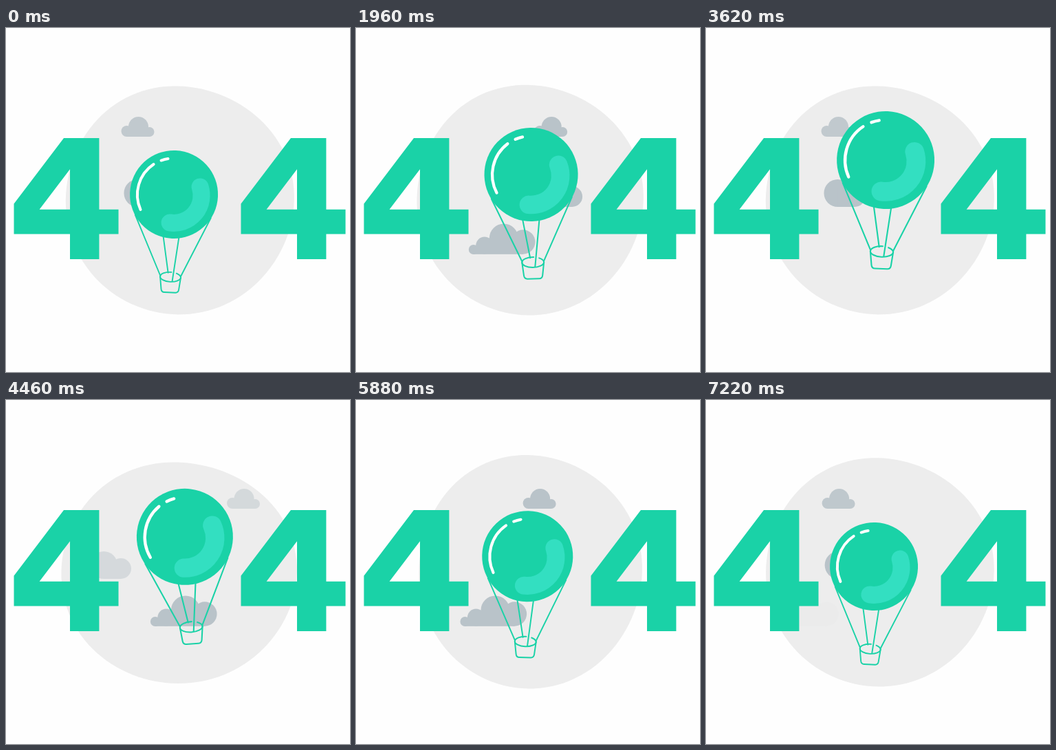
Write an HTML page that moves like this. It is 500x500 px and loops after 7240 ms.

```html
<!DOCTYPE html>
<html lang="en">
<head>
<meta charset="utf-8">
<title>404</title>
<style>
  html, body { margin: 0; width: 100%; height: 100%; overflow: hidden; background: #fefefe; }
  svg { display: block; width: 100vw; height: 100vh; }
  .green { fill: #1ad2a7; }
  .cloud { fill: #b9c3c9; }
  .line { fill: none; stroke-linecap: round; stroke-linejoin: round; }
</style>
</head>
<body>
<svg viewBox="0 0 500 500" role="img" aria-label="404">
  <defs>
    <path id="four" class="green" fill-rule="evenodd"
      d="M11.5 255.5L84 160H135.4V263.8H163.5V299.5H135.4V336H93V299.5H11.5ZM93 205.2L48.6 263.8H93Z"/>
  </defs>
  <path id="blob" fill="#ededed"/>
  <g id="small" class="cloud">
    <circle cx="-17" cy="150" r="8"/><circle cy="143.5" r="14.5"/><circle cx="16" cy="151" r="7"/>
    <rect x="-17" y="146" width="33" height="12"/>
  </g>
  <g id="middle" class="cloud">
    <circle cx="20" cy="240" r="20"/><circle cx="45" cy="245" r="15"/>
    <rect x="20" y="232" width="25" height="28"/>
  </g>
  <g id="large" class="cloud">
    <circle cx="7" cy="322" r="7"/><circle cx="23" cy="316" r="12.5"/>
    <circle cx="51" cy="305.5" r="21"/><circle cx="79" cy="311" r="17.7"/>
    <rect x="7" y="316" width="72" height="12.8"/>
  </g>
  <use href="#four"/>
  <use href="#four" x="330"/>
  <g id="balloon">
    <g class="line" stroke="#1ad2a7" stroke-width="1.9">
      <path d="M-55 32L-14.7 119M55 32L14.7 119M-13 61L-3.7 114M10 61L2.8 126"/>
      <path d="M1 113A15 7 0 1 0 15 120Q14.6 116.6 8.5 114.4"/>
      <path d="M-15 120L-12.8 138Q-12.3 142.5 -8 142.5H8Q12.3 142.5 12.8 138L15 120"/>
    </g>
    <circle class="green" r="64"/>
    <path class="line" stroke="#33dfc1" stroke-width="25" d="M37.5 -12.6A40 40 0 0 1 -4.3 41.2"/>
    <path class="line" stroke="#fff" stroke-width="4"
      d="M-47.6 24A53.2 53.2 0 0 1 -31.3 -42.7M-20.6 -48.6A53 53 0 0 1 -10.7 -51.6"/>
  </g>
</svg>
<script>
const LOOP = 7240, HALF = LOOP / 2, FADE = 640, TAU = 2 * Math.PI;
const { sin, cos, min, max } = Math;
const $ = id => document.getElementById(id);
const place = (id, transform) => $(id).setAttribute("transform", transform);

// A circle that swells sideways, then upright, with slight fixed unevenness.
function drawBlob(t) {
  const swell = sin(TAU * t / HALF);
  const points = Array.from({ length: 120 }, (_, i) => {
    const a = TAU * i / 120;
    const r = 166 + 5.3 * swell * cos(2 * a)
      + (1.9 - 1.2 * swell) * cos(a) + 0.9 * swell * sin(a)
      + cos(3 * a + 0.4) - 0.7 * sin(4 * a);
    return [250 + r * cos(a), 250 + r * sin(a)];
  });
  $("blob").setAttribute("d", "M" + points.join("L") + "Z");
}

// Drifts left at a steady speed and fades out and in around its wrap time.
function drawCloud(id, start, distance, wrap, t) {
  const age = (t - wrap + LOOP) % HALF;
  place(id, `translate(${start - distance * age / HALF} 0)`);
  $(id).setAttribute("opacity", min(1, age / FADE, (HALF - age) / FADE));
}

// Rises and falls once while swaying twice about a point above its centre.
function drawBalloon(t) {
  const rise = (1 - cos(TAU * (t + 35) / LOOP)) / 2;
  const sway = -5 * sin(TAU * (t / HALF - 0.08));
  place("balloon", `translate(${244.5 + 17 * rise} ${242 - 50 * rise}) `
    + `rotate(${sway} 0 -10) scale(${1 + 0.109 * rise})`);
}

const begin = performance.now();
function draw(now) {
  const t = max(0, now - begin) % LOOP;
  drawBlob(t);
  drawCloud("small", 362.7, 200, 540, t);
  drawCloud("middle", 318, 213, 1130, t);
  drawCloud("large", 244.5, 149, 0, t);
  drawBalloon(t);
  requestAnimationFrame(draw);
}
draw(begin);
</script>
</body>
</html>
```
